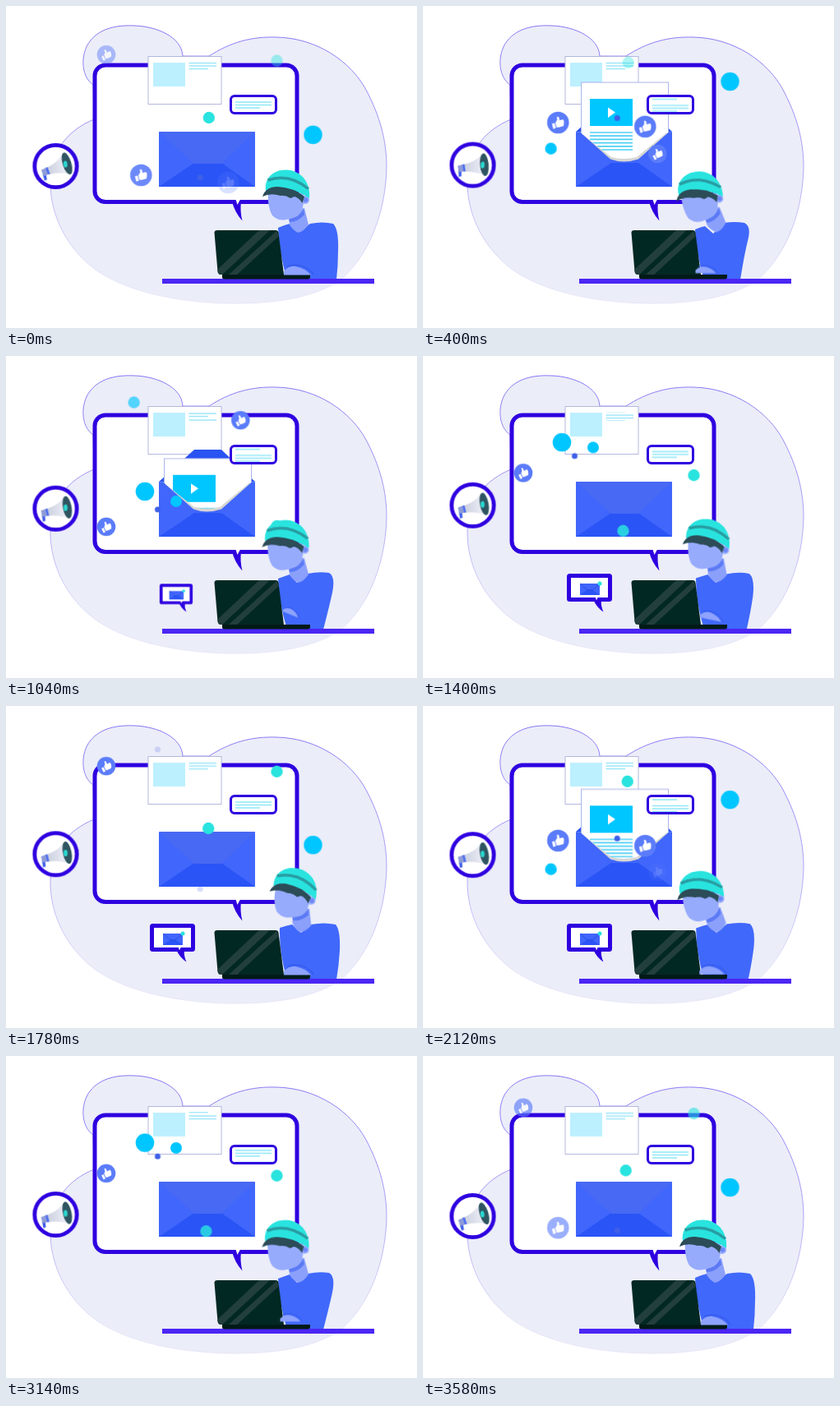
These frames come from a looping animation (500x392 px, 3.6 s). An HTML page:

```html
<!DOCTYPE html>
<html lang="en">
<head>
<meta charset="utf-8">
<title>Mail campaign</title>
<style>
html, body { margin: 0; width: 100%; height: 100%; overflow: hidden; background: #fff; }
svg { display: block; width: 500px; height: 392px; }

.dot { opacity: 0; animation: rise 3600ms linear infinite; }
@keyframes rise {
  0% { transform: translate(var(--x0), var(--y0)); opacity: 0; }
  1.95% { opacity: 1; }
  23.6% { opacity: 1; }
  26.667% { transform: translate(var(--x1), var(--y1)); opacity: 0; }
  100% { transform: translate(var(--x1), var(--y1)); opacity: 0; }
}

.bob { animation: bob 3600ms ease-in-out infinite; }
@keyframes bob {
  0%, 100% { transform: translate(60.5px, 195px); }
  50% { transform: translate(60.5px, 180.3px); }
}
.horn { animation: horn 3600ms ease-in-out infinite; }
@keyframes horn {
  0%, 100% { transform: rotate(-7deg); }
  11.1% { transform: rotate(5deg); }
  28.9% { transform: rotate(0deg); }
  50% { transform: rotate(-1deg); }
  70% { transform: rotate(1deg); }
  87.2% { transform: rotate(-2deg); }
}

.letter { animation: letter 1800ms ease-in-out infinite; }
@keyframes letter {
  0%, 7% { transform: translateY(63px); }
  21.5%, 50% { transform: none; }
  65.6%, 100% { transform: translateY(63px); }
}
.flap, .flapback { transform-origin: 0 153px; animation: flap 1800ms linear infinite; }
.flapback { animation-name: flapback; }
@keyframes flap {
  0%, 1% { transform: none; }
  4.5%, 69.5% { transform: scaleY(0); }
  73%, 100% { transform: none; }
}
@keyframes flapback {
  0%, 4.5% { transform: scaleY(0); }
  8%, 66% { transform: none; }
  69.5%, 100% { transform: scaleY(0); }
}
.feed { animation: feed 1800ms ease-in-out infinite; }
@keyframes feed {
  0%, 1.5% { transform: none; }
  21%, 58% { transform: translateY(-10.5px); }
  82%, 100% { transform: none; }
}
.news { animation: news 1800ms ease-in-out infinite; }
@keyframes news {
  0%, 35% { transform: none; }
  99%, 100% { transform: translateY(-11.5px); }
}

.note { transform-origin: 219px 311px; animation: note 3600ms ease-in-out infinite; }
@keyframes note {
  0%, 25.2% { transform: scale(0); }
  31%, 59% { transform: none; }
  65%, 100% { transform: scale(0); }
}

.head { transform-origin: 352px 262px; animation: head 3600ms ease-in-out infinite; }
@keyframes head {
  0%, 100% { transform: none; }
  11.1%, 17% { transform: rotate(-8deg); }
  28.9% { transform: rotate(-1deg); }
  49.4%, 50.2% { transform: translate(4px, -1px) rotate(8deg); }
  61.5% { transform: rotate(-8deg); }
  70% { transform: rotate(-6.5deg); }
  87.2% { transform: rotate(-1deg); }
}
.body { animation: body 3600ms ease-in-out infinite; }
@keyframes body {
  0%, 100% { d: path("M331 270Q340 266 346 265L356 275L370 265Q385 262 398 265Q405 272 404 298Q404 316 402 333L342 333Q332 300 331 270Z"); }
  11.1%, 17% { d: path("M331 272Q338 269 343 268L353 277L366 264Q380 262 391 264Q400 268 395 286Q391 302 386 333L342 333Q332 300 331 272Z"); }
  28.9%, 70%, 87.2% { d: path("M331 271Q339 268 345 266L354 276L367 265Q381 262 393 264Q401 268 397 288Q393 306 386 333L342 333Q332 300 331 271Z"); }
  49.4%, 50.2% { d: path("M333 270Q342 267 348 266L359 276L371 266Q387 263 401 266Q407 273 406 298Q405 316 402 333L342 333Q332 300 333 270Z"); }
}
.hand { transform-origin: 356px 322px; animation: hand 3600ms ease-in-out infinite; }
@keyframes hand {
  0%, 49.4%, 50.2%, 100% { transform: none; }
  11.1%, 17% { transform: translate(-11px, -1px) scale(.75); }
  28.9% { transform: translate(-8px, -10px) rotate(22deg) scale(.62); }
  70% { transform: translate(-8px, -1px) scale(.8); }
  87.2% { transform: translate(-9px, -3px) scale(.75); }
}
</style>
</head>
<body>
<svg viewBox="0 0 500 392">
  <defs>
    <clipPath id="inEnv"><path d="M0 0H500V219H0Z"/></clipPath>
    <clipPath id="inChat"><rect x="276" y="112" width="50" height="17"/></clipPath>
    <clipPath id="inDoc"><path d="M220 68H260V78.500H220Z"/></clipPath>
    <clipPath id="inLid"><path d="M257 273H328Q331 273 331.500 276L338 327H261Q258 327 257.500 323L253.500 276Q253.500 273 257 273Z"/></clipPath>
    <linearGradient id="cone"><stop offset="0" stop-color="#c9cede"/><stop offset="1" stop-color="#f3f4fa"/></linearGradient>
    <linearGradient id="edge" x2="0" y2="1">
      <stop offset="0" stop-color="#6a55f2"/><stop offset=".5" stop-color="#9a8cf5"/><stop offset=".9" stop-color="#e4e3f8"/>
    </linearGradient>
    <g id="thumb" fill="#fff">
      <path d="M-7.500 -.5H-4.200V6H-7.500Z"/>
      <path d="M-3.200 -.6L-.3 -3.500L.4 -7.300Q2.900 -7.300 2.700 -4.300L2.200 -2.200H6.200Q7.700 -2 7.200 -.4Q7.700 .7 6.900 1.600Q7.200 2.800 6.200 3.500Q6.200 5.600 4.400 5.800H-.4L-3.200 5Z"/>
    </g>
  </defs>

  <path fill="#ebedf8" stroke="url(#edge)" stroke-width=".8"
    d="M106 96C90 85 91 57 102 43C115 26 137 23 157 24C184 25 214 38 215 61H247C273 44 299 37 329 38C378 39 419 67 438 102C455 134 463 164 463 196C462 250 443 300 410 331C375 358 316 363 267 362C206 360 150 348 113 324C74 297 53 254 54 212C56 174 76 151 107 138Z"/>

  <rect x="108" y="72" width="246" height="166.500" rx="13" fill="#fff" stroke="#2e00e0" stroke-width="5"/>
  <path fill="#2e00e0" d="M275 238Q278 251 287.500 261.500Q284.500 250 286 238Z"/>
  <path fill="#fff" d="M279.500 235.500H285L281.500 242Z"/>

  <rect x="173" y="61.500" width="89" height="58" fill="#fff" stroke="#b4b8dc"/>
  <path fill="#bdf0ff" d="M179 69H218V98H179Z"/>
  <g clip-path="url(#inDoc)">
    <path class="news" stroke="#9de6f8" stroke-width="1.500"
      d="M222.500 69.500H256M222.500 73H256M222.500 76.500H246M222.500 81H256M222.500 84.500H256M222.500 88H246"/>
  </g>

  <path class="flapback" fill="#2a54f2" d="M186 153L229 114H262L303 153Z"/>
  <path fill="#264ce0" d="M186 153.500H303V219H186Z"/>
  <g clip-path="url(#inEnv)">
    <g class="letter">
      <rect x="192.500" y="93" width="106" height="110" fill="#fff" stroke="#aab4ea"/>
      <path fill="#00c6ff" d="M203 113H255V146H203Z"/>
      <path fill="#fff" d="M225 123.500L234 129.500L225 136Z"/>
      <path id="copy" stroke="#4fd0f5" stroke-width="1.700"/>
    </g>
  </g>
  <path fill="#d6d6d4" d="M192 154.500L229 184Q244 188 260 184L296 154.500H299.500L264 189L244 192L226 188Z"/>
  <path fill="#4066fb" d="M186 153.500H191L228 186.500Q244 192.500 262 186.500L299 153.500H303V220H186Z"/>
  <path fill="#2a54f6" d="M186 220L229 191H262L303 220Z"/>
  <path class="flap" fill="#4869f3" d="M186 153H303L262 192H229Z"/>

  <rect x="273.500" y="109.500" width="55" height="21" rx="4.500" fill="#fff" stroke="#2e00e0" stroke-width="3"/>
  <g clip-path="url(#inChat)">
    <path class="feed" stroke="#8ee6f8" stroke-width="1.600"
      d="M279 117H323M279 120.500H323M279 124H309M279 131.500H323M279 135H323M279 138.500H309"/>
  </g>

  <g id="dots"></g>

  <g class="bob">
    <circle r="25.700" fill="#fff" stroke="#2e00e0" stroke-width="4.800"/>
    <g class="horn">
      <path fill="#3f5fe8" d="M-17 8L-13 7L-12.500 15L-15.500 16Z"/>
      <path fill="url(#cone)" d="M-12 .5C-3 -1.500 5 -7 11 -15L17 12C9 9 -2 7.500 -10 9Z"/>
      <path fill="#8d9bd8" d="M-18 2.500L-12 .5L-10 9L-16.500 10Z"/>
      <path fill="#4a6cf0" d="M-12.500 .5L-10 0L-8 8.500L-10.500 9Z"/>
      <ellipse cx="14" cy="-1.500" rx="5.300" ry="13.800" transform="rotate(-10 14 -1.500)" fill="#2f5561"/>
      <ellipse cx="12" cy="-1" rx="2.400" ry="4" fill="#29d8d0"/>
    </g>
  </g>

  <g class="note">
    <rect x="177.500" y="267.500" width="50" height="29" rx="1" fill="#fff" stroke="#2e00e0" stroke-width="5"/>
    <path fill="#2e00e0" d="M207.500 297Q211 306 219.500 311.500Q216 304 217 297Z"/>
    <path fill="#fff" d="M209.500 293H213L211 297.500Z"/>
    <path fill="#4066fb" d="M191 277H215V291H191Z"/>
    <path fill="#2a54f6" d="M191 291L200 284.500H206L215 291Z"/>
    <path fill="none" stroke="#2448d8" stroke-width=".8" d="M191 277L200 285H206L215 277"/>
    <circle cx="215" cy="277" r="2.500" fill="#29e3df"/>
  </g>

  <path class="body" fill="#4068fb" d="M331 270Q340 266 346 265L356 275L370 265Q385 262 398 265Q405 272 404 298Q404 316 402 333L342 333Q332 300 331 270Z"/>
  <g class="head">
    <path fill="#8ba0fb" d="M343 250L363 246L368 266Q362 275 355 276Q348 272 345 266Z"/>
    <path fill="#5c7af5" d="M344 258Q356 257 362 247L363 254Q355 263 345 263Z"/>
    <circle cx="364" cy="236" r="5" fill="#97abfd"/>
    <circle cx="364.500" cy="236" r="2.800" fill="#6c87f6"/>
    <path fill="#97abfd" d="M319 225C318 238 320 248 324 255Q330 261 338 260.500Q354 259 359 251Q363 243 362 228Z"/>
    <path fill="#29e3df" d="M316 225C314 210 325 199 341 199.500C359 200 371 215 369 234Q343 216 316 225Z"/>
    <path fill="none" stroke="#289da2" stroke-width="3.500" d="M318.500 212Q344 203 368 222.500"/>
    <path fill="#2c4c58" d="M312 232Q316 219.500 331 220Q350 221 363 232L360.500 240Q357 234 351 232L346 234Q340 230 334 231Q322 227 312 232Z"/>
  </g>

  <path fill="#4b26f4" d="M190 332H448V338H190Z"/>
  <g clip-path="url(#inLid)">
    <path fill="#022823" d="M250 270H340V328H250Z"/>
    <path fill="#223f3d" d="M256 322L309 272H322L262 328ZM270 328L329 274L332 280L280 328Z"/>
  </g>
  <path fill="#011a18" d="M263 327H370V330Q370 332.500 367 332.500H266Q263 332.500 263 330Z"/>
  <g class="hand">
    <path fill="none" stroke="#3459e8" stroke-width="1.200" d="M342 317Q353 313 363 317.500Q371 321 374 327"/>
    <path fill="#8ea3fd" d="M338 323Q344 316 352 317Q364 319 371 327.500L350 327.500H338Z"/>
  </g>
</svg>
<script>
const LOOP = 3600, SECOND = 1743, LIFE = 0.96;
const CYAN = '#00c6ff', TEAL = '#29e3df', BLUE = '#3f5fe8', LIKE = '#5b7cfa';

document.getElementById('copy').setAttribute('d',
  Array.from({ length: 6 }, (_, i) => `M203 ${154 + i * 4.2}H255`).join(''));

// x, first y, speed in px/s, start in ms, radius, colour, sideways drift
const dots = [
  [169, 218, 166, 721, 11.3, CYAN],
  [207, 222, 182, 793, 7, CYAN],
  [184.5, 222.7, 181, 843, 3.5, BLUE],
  [329.5, 223.6, 172, 945, 7.2, TEAL],
  [122, 224.4, 182, 950, 11.3, LIKE],
  [243, 223, 168, 1340, 7.2, TEAL, 7.3],
  [373.5, 224, 162, 1443, 11.2, CYAN],
  [236.2, 225.5, 181, 1766, 3.5, BLUE],
  [164.3, 216, 160, 1795, 13.3, LIKE],
  [270.3, 217.5, 170, 1842, 13.3, LIKE],
  [155.6, 219, 183, 2010, 7.2, CYAN],
  [285.3, 203.5, 159, 2110, 11.3, LIKE]
];

const thumb = r => r > 12
  ? '<use href="#thumb" transform="rotate(-14)"/>'
  : '<use href="#thumb" transform="rotate(-27) scale(.85)"/>';

const dot = ([x, y, speed, start, r, fill, drift = 0], shift) => {
  const delay = (start + shift) % LOOP - LOOP;
  const vars = `--x0:${x}px;--y0:${y}px;--x1:${x + drift * LIFE}px;--y1:${y - speed * LIFE}px`;
  return `<g class="dot" style="${vars};animation-delay:${delay}ms">` +
    `<circle r="${r}" fill="${fill}"/>${fill === LIKE ? thumb(r) : ''}</g>`;
};

document.getElementById('dots').innerHTML =
  [0, SECOND].map(shift => dots.map(d => dot(d, shift)).join('')).join('');
</script>
</body>
</html>
```
